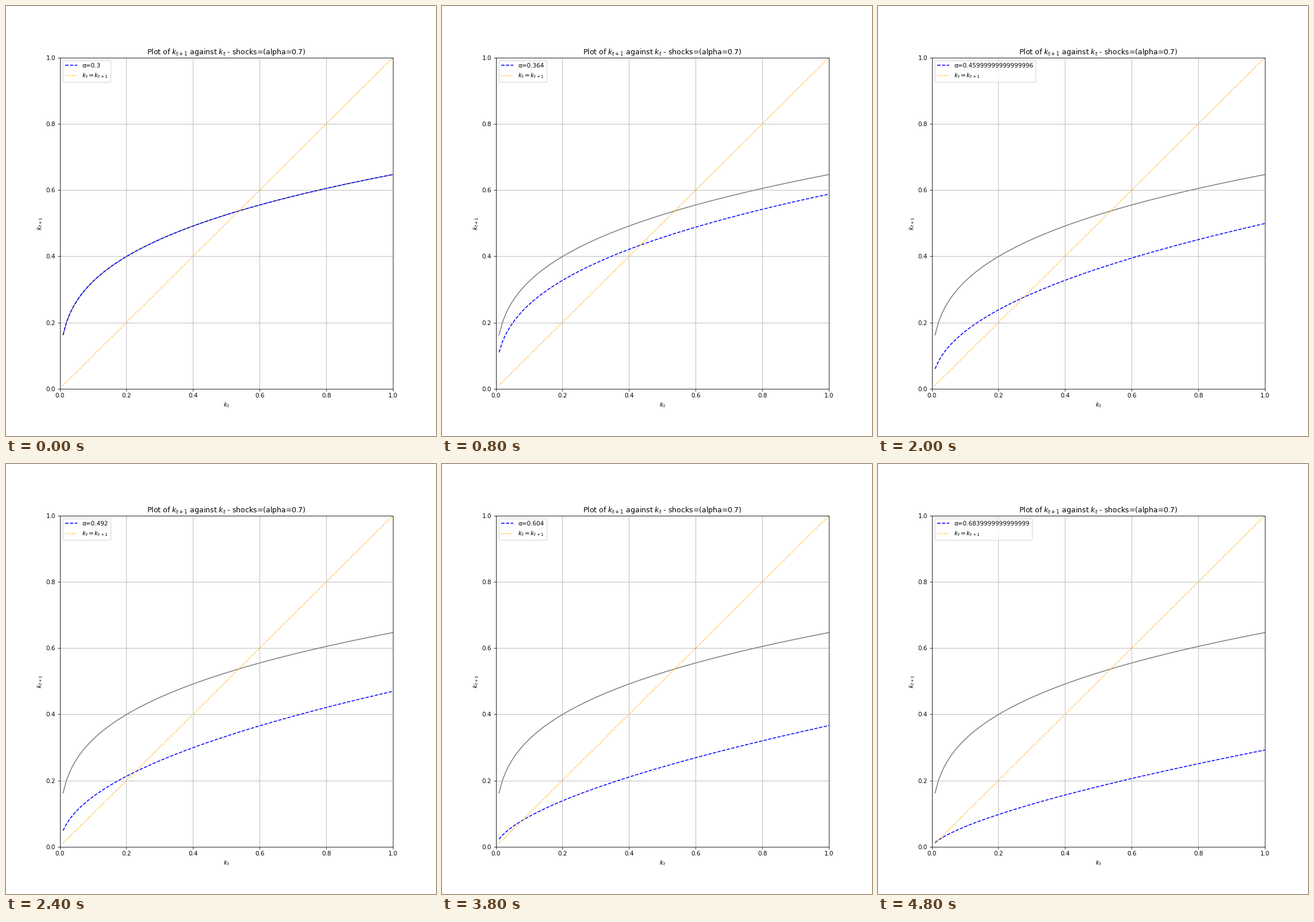
Recreate the animation shown at these times as a matplotlib script. Size 748 by 748 pixels, loop 5 s.

```python
import matplotlib.pyplot as plt
import numpy as np
from matplotlib.animation import FuncAnimation

FRAMES = 25
INTERVAL = 200
ALPHA_START, ALPHA_END = 0.3, 0.7
SCALE = 0.924

plt.rcParams["font.family"] = "DejaVu Sans"
k = np.linspace(0.01, 1, 100)


def next_capital(alpha):
    return SCALE * (1 - alpha) * k**alpha


fig, ax = plt.subplots(figsize=(10, 10), dpi=74.8)
ax.plot(k, next_capital(ALPHA_START), color="gray")
curve, = ax.plot(k, next_capital(ALPHA_START), "--", color="blue",
                 label=f"α={ALPHA_START}")
ax.plot(k, k, ":", color="orange", label="$k_t = k_{t+1}$")

ax.set(xlim=(0, 1), ylim=(0, 1), xlabel="$k_t$", ylabel="$k_{t+1}$",
       title="Plot of $k_{t+1}$ against $k_t$ - shocks=(alpha=0.7)")
ax.grid(True)
legend = ax.legend(loc="upper left")


def update(i):
    # The label keeps full float precision, so rounding residue shows.
    alpha = ALPHA_START + (ALPHA_END - ALPHA_START) * i / FRAMES
    curve.set_ydata(next_capital(alpha))
    legend.get_texts()[0].set_text(f"α={alpha}")
    return curve, legend


anim = FuncAnimation(fig, update, frames=FRAMES, interval=INTERVAL,
                     repeat=True, repeat_delay=0)
plt.show()
```
